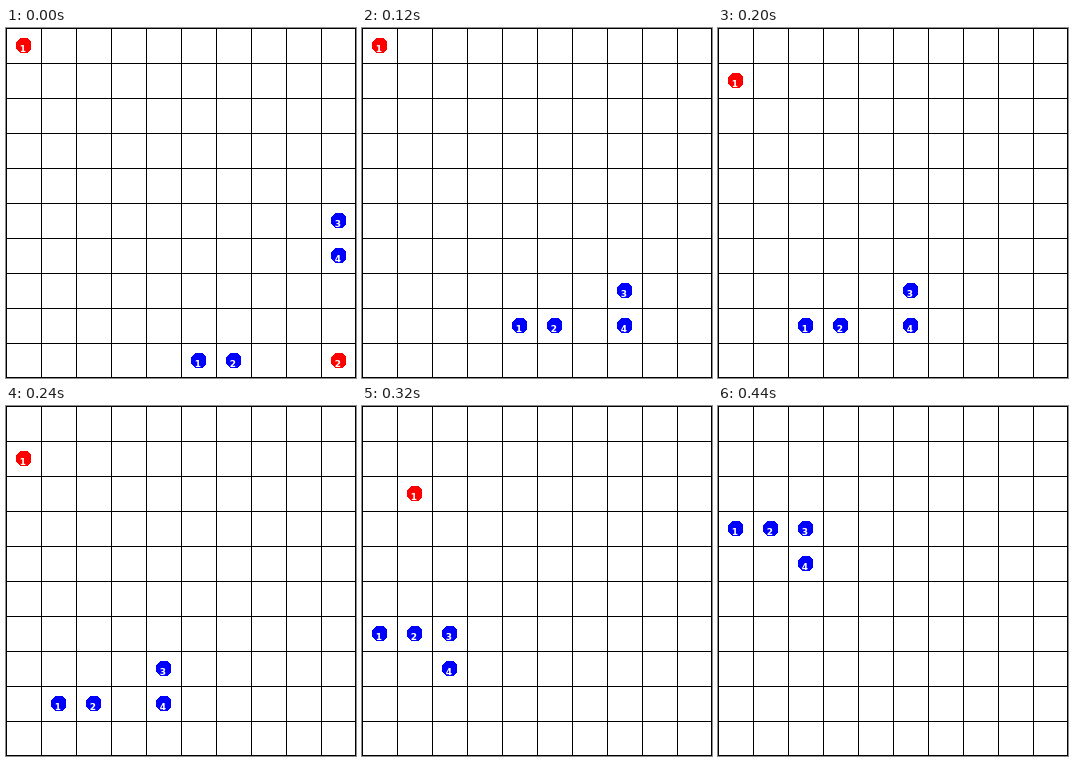
An HTML page for the animation above (480 ms loop, 350 by 350 pixels).

```html
<!DOCTYPE html>
<html lang="en">
<head>
<meta charset="utf-8">
<title>Pursuit on a grid</title>
<style>
  html, body { margin: 0; width: 100%; height: 100%; overflow: hidden; background: #fff; }
  svg { display: block; width: 350px; height: 350px; }
  path { shape-rendering: crispEdges; }
  text { font: bold 9px "DejaVu Sans", sans-serif; fill: #fff; text-anchor: middle; }
</style>
</head>
<body>
<svg viewBox="0 0 350 350"></svg>
<script>
const CELL = 35, SIZE = 350, STEP = 40, STEPS = 12;
const OCTAGON = 'M14 10h7l4 4v7l-4 4h-7l-4-4v-7z';
const svg = document.querySelector('svg');

// Routes are turning points: [step, column, row].
const lowerPair = [[0, 5, 9], [2, 6, 8], [7, 0, 8], [9, 0, 5], [11, 0, 3]];
const rightPair = [[0, 9, 5], [2, 9, 7], [7, 3, 7], [9, 2, 5], [11, 2, 3]];
const wanderer = [[0, 0, 0], [2, 0, 0], [4, 1, 1], [5, 0, 1], [9, 2, 3], [10, 2, 3]];
const cornered = [[0, 9, 9], [1, 9, 8]];

const shift = (route, dx, dy) => route.map(([step, x, y]) => [step, x + dx, y + dy]);

drawGrid();
const tokens = [
  makeToken('red', 1, wanderer),
  makeToken('red', 2, cornered),
  makeToken('blue', 1, lowerPair),
  makeToken('blue', 2, shift(lowerPair, 1, 0)),
  makeToken('blue', 3, rightPair),
  makeToken('blue', 4, shift(rightPair, 0, 1)),
];

function add(parent, tag, attrs, text = '') {
  const node = document.createElementNS('http://www.w3.org/2000/svg', tag);
  for (const key in attrs) node.setAttribute(key, attrs[key]);
  node.textContent = text;
  return parent.appendChild(node);
}

function drawGrid() {
  let d = '';
  for (let i = 0; i <= SIZE; i += CELL) {
    const p = Math.min(i, SIZE - 1) + 0.5;
    d += `M${p} 0V${SIZE}M0 ${p}H${SIZE}`;
  }
  add(svg, 'path', { d, stroke: '#000', fill: 'none' });
}

function makeToken(fill, label, route) {
  const node = add(svg, 'g', {});
  add(node, 'path', { d: OCTAGON, fill });
  add(node, 'text', { x: 17, y: 24 }, label);
  return { node, route };
}

// Whole cell reached between two turning points, or null once the route is over.
function cellAt(route, step) {
  const next = route.findIndex(point => point[0] >= step);
  if (next < 0) return null;
  const to = route[next], from = route[Math.max(0, next - 1)];
  const part = to === from ? 0 : (step - from[0]) / (to[0] - from[0]);
  return [1, 2].map(axis => Math.floor(from[axis] + (to[axis] - from[axis]) * part));
}

function render() {
  const step = Math.floor(performance.now() / STEP) % STEPS;
  for (const { node, route } of tokens) {
    const cell = cellAt(route, step);
    node.style.display = cell ? '' : 'none';
    if (cell) node.setAttribute('transform', `translate(${cell[0] * CELL} ${cell[1] * CELL})`);
  }
  requestAnimationFrame(render);
}

render();
</script>
</body>
</html>
```
